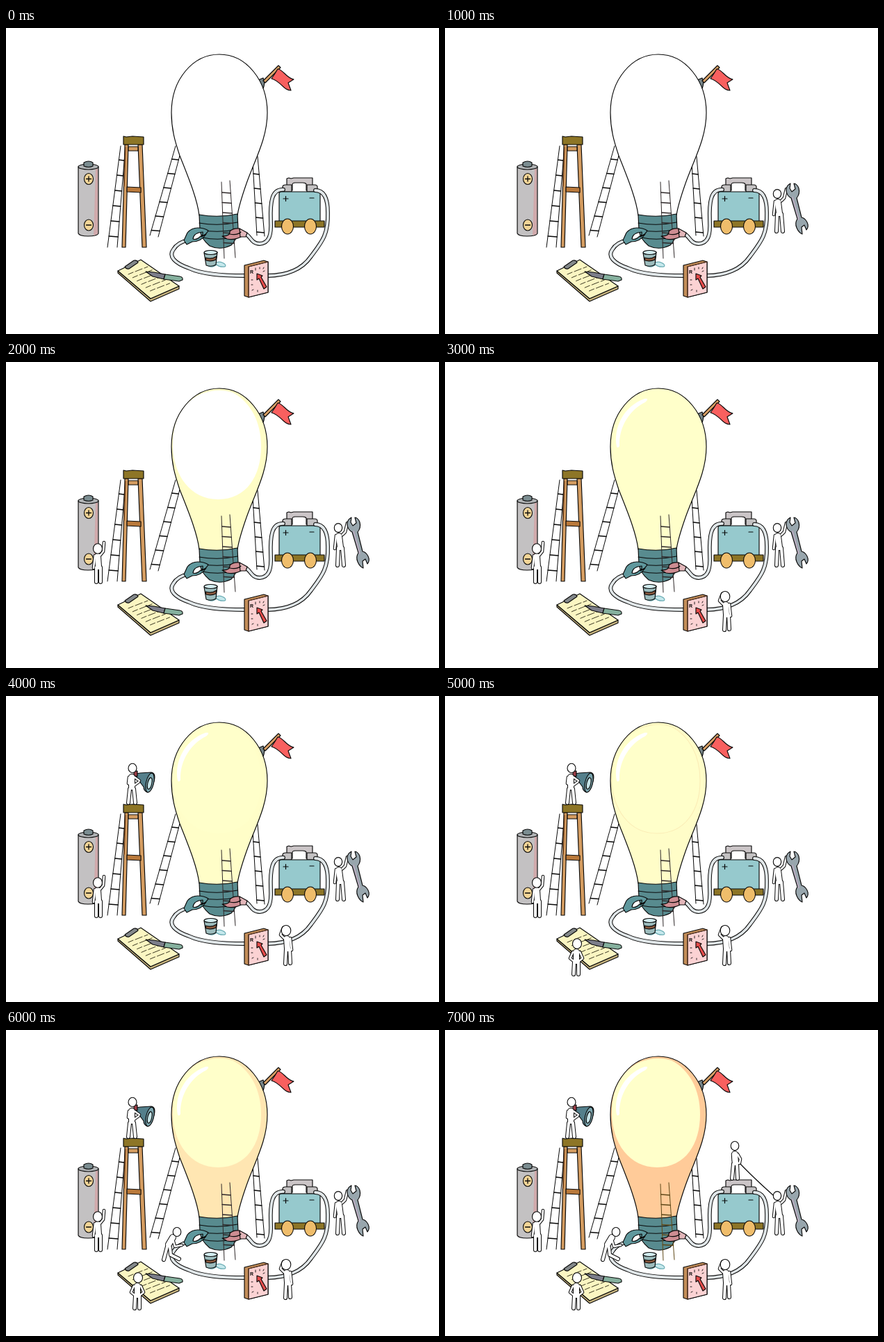
Write an HTML page with a canvas that moves like this. It is 623x441 px and loops after 8000 ms.

```html
<!DOCTYPE html>
<html lang="en">
<head>
<meta charset="utf-8">
<title>Lighting the bulb</title>
<style>
html, body { margin: 0; width: 100%; height: 100%; overflow: hidden; background: #fff; }
canvas { display: block; }
</style>
</head>
<body>
<canvas id="stage" width="623" height="441"></canvas>
<script>
const ctx = document.getElementById('stage').getContext('2d');
const INK = '#080808', TEAL = '#588b8f', OLIVE = '#8d7526', GRAY = '#c3c1c2', WOOD = '#d49c60';
const GLASS = 'M278 270C275 245 261 212 250 184C243 163 238 146 238 122C238 74 269 38 307 38C346 38 376 76 376 122C376 159 358 190 346 224C339 244 335 256 333 270Q306 275 278 270Z';
const CORE = 'M240 118C240 164 266 198 305 198C346 198 367 164 367 122C367 85 351 57 326 44C292 33 240 52 240 118Z';

ctx.lineCap = ctx.lineJoin = 'round';

function shape(d, fill, stroke = INK, width = 1.15) {
  const path = new Path2D(d);
  if (fill) { ctx.fillStyle = fill; ctx.fill(path); }
  if (stroke) { ctx.strokeStyle = stroke; ctx.lineWidth = width; ctx.stroke(path); }
}

const line = (d, color = INK, width = 1.15) => shape(d, null, color, width);

function oval(x, y, rx, ry, fill) {
  ctx.beginPath();
  ctx.ellipse(x, y, rx, ry, 0, 0, 7);
  ctx.fillStyle = fill;
  ctx.fill();
  ctx.strokeStyle = INK;
  ctx.lineWidth = 1.1;
  ctx.stroke();
}

function tube(d, fill = '#e0e6e8', width = 3.8) {
  line(d, INK, width + 2);
  line(d, fill, width);
}

// Rails run from top to bottom; rungs join them at even steps.
function ladder([ax, ay, bx, by], [cx, cy, dx, dy], rungs, start, step, color = INK) {
  let d = '';
  for (let i = 0; i < rungs; i++) {
    const y = start + i * step;
    const x1 = ax + (bx - ax) * (y - ay) / (by - ay);
    const x2 = cx + (dx - cx) * (y + 1 - cy) / (dy - cy);
    d += `M${x1} ${y}L${x2} ${y + 1}`;
  }
  line(`M${ax} ${ay}L${bx} ${by}M${cx} ${cy}L${dx} ${dy}`, color, 1);
  line(d, color, 1.4);
}

// Limbs merge into one white figure with a shared outline.
function person(x, y, r, torso, legs, arms) {
  const parts = [[torso, 8], [legs, 4], [arms, 2.6]];
  for (const [d, w] of parts) line(d, INK, w + 2);
  for (const [d, w] of parts) line(d, '#fff', w);
  oval(x, y, r, r + .7, '#fff');
}

function battery() {
  shape('M104 200V296Q106 300 118 300Q131 300 133 296V200Z', GRAY);
  shape('M129 203H132V297L126 299Z', '#d0a9ab', null);
  oval(118.5, 200, 14.5, 4, '#b1b4b6');
  shape('M112 199V194Q119 190 125 194V199Q119 202 112 199Z', '#7b8d91');
  for (const y of [217.5, 284]) {
    oval(119, y, 6.5, 8, '#f2d597');
    line(`M115.5 ${y}H122.5`, INK, 1.3);
  }
  line('M119 214V221', INK, 1.3);
}

function stepladder() {
  ladder([165, 170, 146, 316], [171, 181, 160, 316], 6, 190, 22);
  shape('M171 168H176L172 316H167Z', WOOD);
  shape('M190 168H196L202 316H196Z', WOOD);
  line('M172 172L170 228', '#7a4a22', 1.5);
  shape('M176 171H190V177H176Z', WOOD);
  shape('M174 229L194 230V237L174 236Z', '#b9793b');
  shape('M169 156L173 157L182 156L198 157V168H169Z', OLIVE);
}

function flag() {
  shape('M363 75L370 72Q374 80 369 89L364 87Z', '#77868a');
  shape('M370 76L392 54L395 57L373 79Z', '#d8a066');
  shape('M391 59C399 60 403 72 414 74L406 79L410 90C399 90 396 77 382 73Q387 66 391 59Z', '#f8605f');
}

function bulb(look) {
  shape(GLASS, look.shade, null);
  if (look.core) {
    ctx.save();
    ctx.clip(new Path2D(GLASS));
    shape(CORE, look.core, look.rim || null);
    ctx.restore();
  }
  if (look.shine) shape('M247 122C242 96 256 64 287 53Q295 52 288 58C267 68 250 92 251 121Q249 125 247 122Z', '#fff', null);
  line(GLASS);
  shape('M278 269Q306 274 333 268L334 290Q332 306 324 313Q308 321 293 314Q280 303 279 291Z', TEAL);
  line('M278 281Q306 286 333 280M279 291Q306 296 334 290M283 302Q306 307 331 301');
  ladder([310, 222, 314, 332], [322, 220, 330, 331], 6, 237, 14.5, look.rail || '#2f292a');
}

function charger() {
  shape('M404 234V217L407 216L410 217L414 216H441V234H432V225Q431 223 427 223H416Q412 223 412 226V234Z', '#cbc5c7');
  shape('M398 236V228Q399 226 402 226H411V236ZM433 236V226H444Q448 226 448 229V236Z', GRAY);
  shape('M396 236H449Q452 236 452 239V282H393V239Q393 236 396 236Z', '#96c9cd');
  line('M399 246H406M402.500 242.500V249.500M437 245H443', INK, 1.2);
  shape('M387 278H458V287H387Z', OLIVE);
  for (const x of [405, 438]) oval(x, 286, 8.5, 11, '#efbd6b');
}

function cables() {
  tube('M345 297C352 300 353 311 365 311C379 310 382 298 381 278C380 251 382 232 399 233');
  tube('M445 234C459 234 463 249 463 266C464 298 454 309 439 329C426 348 403 357 376 357');
  tube('M344 357C310 357 282 355 263 346C243 339 233 329 241 319Q247 309 261 306');
}

function clamps() {
  shape('M256 306L261 295Q267 288 276 288Q285 288 291 292Q288 298 281 301Q284 296 283 294Q270 295 269 304Q274 306 280 300L288 297Q281 308 268 308L260 312Z', '#5f989d');
  shape('M311 300Q323 300 322 293Q327 288 336 289L338 301Q329 306 318 304Z', '#cd8d92');
  shape('M336 289L347 295L345 301L337 301Z', '#e2b6b9');
  line('M322 297Q333 299 338 294');
}

function bucket() {
  shape('M300 339Q306 336 311 338Q318 341 315 344Q307 345 303 341Q295 347 290 342Z', '#c5e8ec', '#67a9b1');
  shape('M285 324L288 342Q296 345 302 341L304 323Z', '#9cbcbd');
  shape('M287 331Q296 334 303 329L302 334Q295 337 288 335Z', '#8d5c41');
  oval(294.5, 323.5, 9.5, 3, '#d2edf0');
}

function clipboard() {
  shape('M161 350L208 390L249 372V376L208 394L161 353Z', '#c9b680');
  shape('M194 334L249 372L208 390L161 350Z', '#fbf6c2');
  let rows = '';
  for (let i = 0; i < 6; i++) {
    const x = 176 + i * 6.3, y = 355 + i * 4.8;
    rows += `M${x} ${y}l7 -3m3 -1l10 -4m3 -1l5 -2`;
  }
  line(rows, '#3d3a24', 1);
  shape('M171 344L184 335Q189 334 190 338L177 347Q173 348 171 344Z', '#84898b');
  shape('M201 351L213 352L229 355L227 362L211 358Z', '#7c7e8a');
  shape('M229 355L250 358Q255 359 254 363L249 365L227 362Z', '#85b09e');
}

function gauge() {
  shape('M343 342L371 335L377 337V381L349 388L343 386Z', '#c38d58');
  shape('M349 344L377 337V381L349 388Z', '#fbd2d3');
  line('M349 344L377 337M349 344V388', '#613b26');
  line('M359 346v3M365 345v2M371 345l-1 2M353 363h2M353 370h2M354 378l2 -1M362 378v2M370 351l2 -1', INK, .9);
  shape('M361 354L369 357L367 359L375 373L371 376L364 361L361 363Z', '#e64b4a');
  ctx.fillStyle = INK;
  ctx.font = 'bold 7px Arial, "Liberation Sans", sans-serif';
  ctx.fillText('R', 351, 354);
}

function wrench() {
  shape('M497 224Q490 228 491 235Q492 242 498 245L507 275Q503 281 506 288Q509 295 514 297L513 287L517 284L520 291Q524 286 521 280Q518 274 513 273L506 245Q511 239 509 231Q507 225 502 224L504 232L499 236L496 231Z', '#98a6ad');
  line('M500 244L509 276', '#b7a9bd', 2);
}

function spotlight() {
  shape('M188 112L193 111L209 110Q216 111 213 123Q210 137 204 139Q198 137 198 131L192 123L187 119Z', '#547f8b');
  ctx.save();
  ctx.translate(207, 125);
  ctx.rotate(.22);
  oval(0, 0, 5.5, 14, '#7ba5ae');
  oval(0, 1, 3, 8.5, '#c5e4e8');
  ctx.restore();
  shape('M184 109L189 108V116L184 115Z', '#9c3f48');
}

const helpers = [
  null,
  () => {
    person(478, 239, 5.7, 'M479 251L481 267', 'M478 268L477 293M484 268L486 293', 'M475 250L473 269M484 249L488 245L491 232');
    wrench();
  },
  () => person(132, 269, 6.5, 'M132 280L133 295', 'M130 296V317M136 296V317', 'M128 279L126 297M136 278L140 273L141 260'),
  () => person(403, 338, 6.8, 'M404 350L405 364', 'M403 365L402 386M408 365L409 385', 'M400 349L395 344L399 334M409 349L411 366'),
  () => {
    spotlight();
    person(182, 104, 6, 'M181 117L181 131', 'M178 134L176 154M184 134L186 154', 'M177 117L176 126L184 129L191 124M185 117L192 122');
  },
  () => person(190, 357, 6.5, 'M189 369L189 382', 'M186 383L185 401M192 383L192 401', 'M184 369L180 378L185 382M194 369L198 378L193 382'),
  () => person(246, 291, 5.8, 'M240 299L234 309', 'M232 312L227 331M236 313L237 324L249 330', 'M240 301L243 312L253 310'),
  () => {
    person(417, 167, 5.8, 'M417 179L418 191', 'M415 193L413 214M420 193L421 214', 'M414 179L415 191L424 192M421 179L425 186L424 191');
    line('M425 193Q442 211 472 238');
  }
];

const glow = { core: '#ffffca', shine: true };
const looks = [
  { shade: '#fff' },
  { shade: '#fff' },
  { shade: '#fffdc6', core: '#fff' },
  { shade: '#ffffca', shine: true },
  { ...glow, shade: '#fffec8' },
  { ...glow, shade: '#fffdc8', rim: '#fbedb7' },
  { ...glow, shade: '#ffe6b2' },
  { ...glow, shade: '#ffcb99', rail: '#5f4919' }
];

function draw(step) {
  ctx.fillStyle = '#fff';
  ctx.fillRect(0, 0, 623, 441);
  ladder([244, 170, 207, 299], [250, 184, 219, 301], 6, 189, 20.5);
  ladder([355, 194, 361, 299], [362, 185, 372, 300], 5, 210, 21);
  battery();
  stepladder();
  flag();
  bulb(looks[step]);
  charger();
  cables();
  clamps();
  bucket();
  clipboard();
  gauge();
  for (let i = 1; i <= step; i++) helpers[i]();
}

let shown = -1;
function tick() {
  const step = Math.floor(performance.now() % 8000 / 1000);
  if (step !== shown) draw(shown = step);
  requestAnimationFrame(tick);
}
tick();
</script>
</body>
</html>
```
